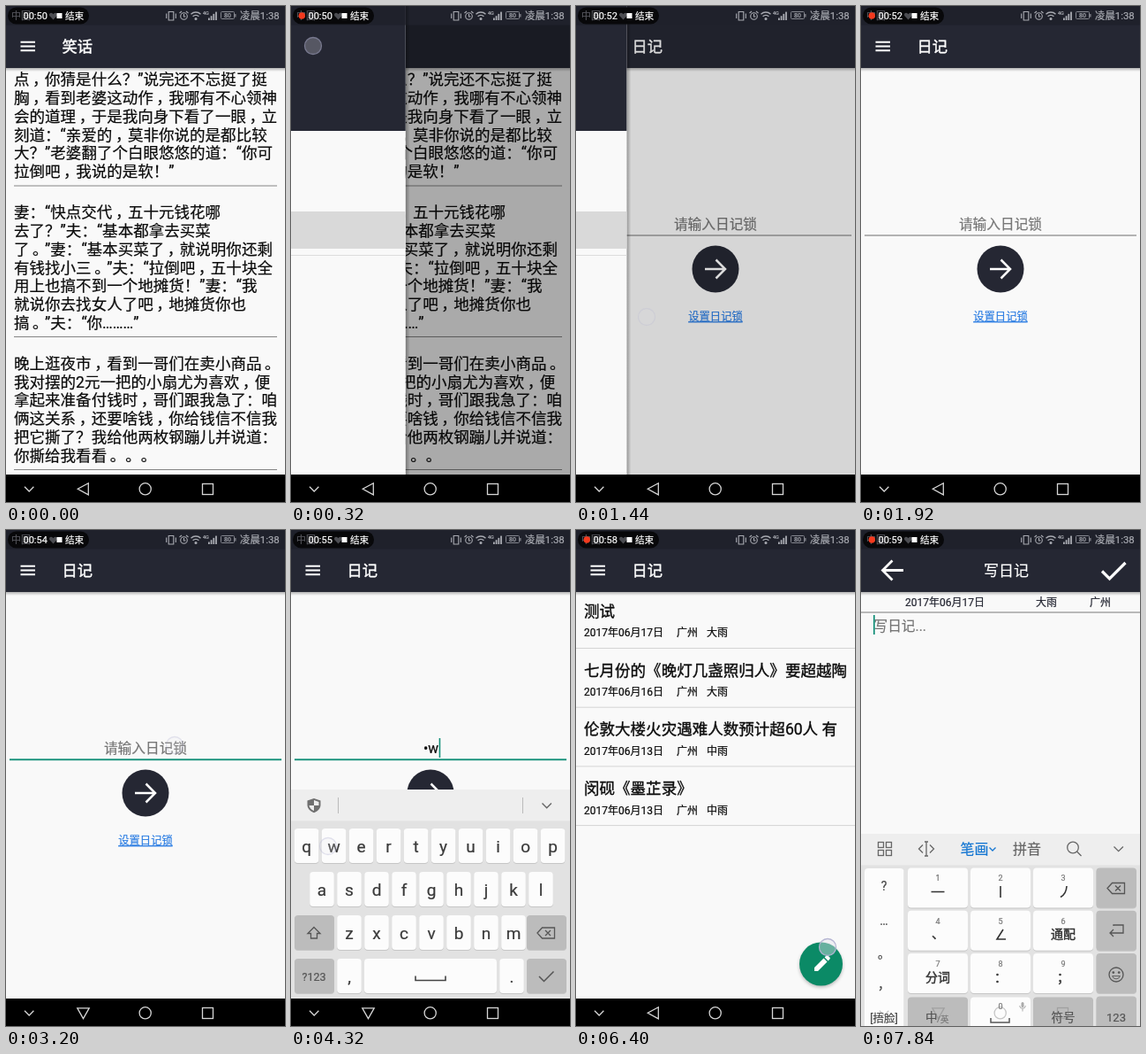
Write an HTML page that moves like this. It is 316x560 px and loops after 8 s.

```html
<!DOCTYPE html>
<html lang="zh-CN">
<head>
<meta charset="utf-8">
<title>日记</title>
<style>
html, body { margin: 0; width: 100%; height: 100%; overflow: hidden; background: #000; }
svg { display: block; width: 316px; height: 560px; }
text {
  font-family: Roboto, "Noto Sans CJK SC", "Noto Sans CJK", sans-serif;
  font-kerning: none; font-feature-settings: "chws" 0, "halt" 0; text-spacing-trim: space-all;
  white-space: pre;
}
</style>
</head>
<body>
<svg id="stage" viewBox="0 0 316 560">
  <defs>
    <linearGradient id="down" x2="0" y2="1">
      <stop stop-opacity=".28"/><stop offset="1" stop-opacity="0"/>
    </linearGradient>
    <linearGradient id="side">
      <stop stop-opacity=".3"/><stop offset="1" stop-opacity="0"/>
    </linearGradient>
    <filter id="soft" x="-30%" y="-30%" width="160%" height="160%"><feGaussianBlur stdDeviation="2"/></filter>
  </defs>
</svg>
<script>
const LOOP = 8000, STEP = 160, FLOOR = 529, MENU = 245;
const NAVY = '#252733', PAPER = '#f9f9f9', TEAL = '#15907a', INK = '#0c0c0c';
const stage = document.getElementById('stage');

function el(parent, tag, attrs = {}, str) {
  const node = document.createElementNS('http://www.w3.org/2000/svg', tag);
  for (const k in attrs) node.setAttribute(k, attrs[k]);
  if (str !== undefined) node.textContent = str;
  return parent.appendChild(node);
}
const group = (p, attrs) => el(p, 'g', attrs);
const rect = (p, x, y, width, height, fill, rx = 0) => el(p, 'rect', { x, y, width, height, fill, rx });
const disc = (p, cx, cy, r, fill) => el(p, 'circle', { cx, cy, r, fill });
const ring = (p, cx, cy, r, stroke, w = 1.3) =>
  el(p, 'circle', { cx, cy, r, fill: 'none', stroke, 'stroke-width': w });
const line = (p, d, stroke, w = 1.3, more) =>
  el(p, 'path', { d, fill: 'none', stroke, 'stroke-width': w, ...more });
const shape = (p, d, fill) => el(p, 'path', { d, fill });
// y is the middle of the glyphs
const text = (p, x, y, str, size, fill, more) => el(p, 'text',
  { x, y: y + size * 0.37, 'font-size': size, fill, stroke: fill, 'stroke-width': .22, ...more }, str);
const MID = { 'text-anchor': 'middle' };
const BOLD = { 'font-weight': 500, 'stroke-width': .45 };

// Commas and full stops sit nearer the middle of their cells
function prose(p, x, y, str, size) {
  const node = text(p, x, y, '', size, INK);
  str.split(/([，。]+)/).forEach((run, i) =>
    el(node, 'tspan', { dx: i ? (i % 2 ? size : -size) * .2 : 0 }, run));
}

function bars(p) {
  rect(p, 0, 0, 316, FLOOR, PAPER);
  rect(p, 0, 70, 316, 4, 'url(#down)');
  rect(p, 0, 0, 316, 70, NAVY);
  rect(p, 0, 0, 316, 21.5, '#1f212b');
}
function titled(title) {
  const p = group(stage);
  bars(p);
  line(p, 'M16.5 40.7h16.5M16.5 45.5h16.5M16.5 50.3h16.5', '#fff', 1.9);
  text(p, 63.5, 46, title, 17.3, '#fff', BOLD);
  return p;
}

// Jokes
const jokes = titled('笑话');
const stories = [
  [83, ['点，你猜是什么？”说完还不忘挺了挺', '胸，看到老婆这动作，我哪有不心领神', '会的道理，于是我向身下看了一眼，立',
    '刻道：“亲爱的，莫非你说的是都比较', '大？”老婆翻了个白眼悠悠的道：“你可', '拉倒吧，我说的是软！”']],
  [233, ['妻：“快点交代，五十元钱花哪', '去了？”夫：“基本都拿去买菜', '了。”妻：“基本买菜了，就说明你还剩',
    '有钱找小三。”夫：“拉倒吧，五十块全', '用上也搞不到一个地摊货！”妻：“我', '就说你去找女人了吧，地摊货你也', '搞。”夫：“你………”']],
  [403.5, ['晚上逛夜市，看到一哥们在卖小商品。', '我对摆的2元一把的小扇尤为喜欢，便', '拿起来准备付钱时，哥们跟我急了：咱',
    '俩这关系，还要啥钱，你给钱信不信我', '把它撕了？我给他两枚钢蹦儿并说道：', '你撕给我看看。。。']]
];
for (const [top, rows] of stories)
  rows.forEach((row, i) => prose(jokes, 9, top + i * 20.75, row, 17.55));
for (const y of [202.5, 373, 523]) rect(jokes, 9, y, 298, 1, '#858585');

// Diary lock
const lock = titled('日记');
const hint = text(lock, 158, 246.5, '请输入日记锁', 15.7, '#777', MID);
const entry = text(lock, 158.5, 246.5, '', 15.7, INK, MID);
const caret = rect(lock, 168, 235, 1.6, 22, TEAL);
const rule = rect(lock, 4, 258.5, 308, 1, '#6f6f6f');
const focusRule = rect(lock, 4, 258.3, 308, 1.9, TEAL);
disc(lock, 158, 297, 26.5, NAVY);
line(lock, 'M146 297h22M158.5 286.5l10.5 10.5l-10.5 10.5', '#fff', 2.5);
text(lock, 158, 350.5, '设置日记锁', 12.3, '#2f7fe3', { ...MID, 'text-decoration': 'underline' });

// Diary list
const list = titled('日记');
const notes = [
  ['测试', '17', '大雨'],
  ['七月份的《晚灯几盏照归人》要超越陶', '16', '大雨'],
  ['伦敦大楼火灾遇难人数预计超60人 有', '13', '中雨'],
  ['闵砚《墨芷录》', '13', '中雨']
];
notes.forEach(([title, day, sky], i) => {
  const y = i * 66.7;
  text(list, 9, 91.5 + y, title, 17.55, INK, { 'stroke-width': .35 });
  text(list, 9, 116 + y, `2017年06月${day}日`, 12, INK);
  text(list, 114, 116 + y, '广州', 12, INK);
  text(list, 148, 116 + y, sky, 12, INK);
  rect(list, 0, 133 + y, 316, 1, '#d4d4d4');
});
el(list, 'circle', { cx: 277.5, cy: 492, r: 24, opacity: .3, filter: 'url(#soft)' });
disc(list, 277.5, 490, 24.5, '#0b8a66');
shape(list, 'M270 494v4h4l10.5-10.5l-4-4zM281.6 482.4l4 4l1.8-1.8q.9-1 0-2l-2-2q-1-.9-2 0z', '#fff');

// New entry
const write = group(stage);
bars(write);
line(write, 'M48 45.5H25M35.5 34.5l-11 11l11 11', '#fff', 2.8);
line(write, 'M273 46.5l8.5 8.5l18-18', '#fff', 3.2);
text(write, 164.5, 46, '写日记', 17, '#fff', MID);
text(write, 50, 82, '2017年06月17日', 12, NAVY);
text(write, 198, 82, '大雨', 12, NAVY);
text(write, 259, 82, '广州', 12, NAVY);
rect(write, 0, 92.5, 316, 1, '#7a7a7a');
text(write, 14.5, 108, '写日记...', 15.7, '#777');
const pen = rect(write, 14, 96, 1.7, 22, TEAL);

// Drawer
const scrim = rect(stage, 0, 21.5, 316, FLOOR - 21.5, '#000');
const drawer = group(stage);
rect(drawer, MENU, 0, 5, FLOOR, 'url(#side)');
rect(drawer, 0, 0, MENU, FLOOR, PAPER);
rect(drawer, 0, 0, MENU, 141, NAVY);
rect(drawer, 0, 0, MENU, 21.5, '#1f212b');
disc(drawer, 35.5, 69, 6.2, '#fff');
shape(drawer, 'M23 87v-3c0-4 8-6.2 12.5-6.2s12.5 2.2 12.5 6.2v3z', '#fff');
text(drawer, 22, 118.5, 'aLumo', 12.2, '#fff', { 'font-weight': 500 });
rect(drawer, 0, 232, MENU, 42, '#d9d9d9');
rect(drawer, 0, 281, MENU, 1, '#dcdcdc');
text(drawer, 14, 303, '个人', 12.2, '#707070');
['新闻', '天气', '笑话', '日记', '备忘', '关于'].forEach((name, i) =>
  text(drawer, 63.3, 169 + i * 42 + (i > 2 ? 50 : 0), name, 12.2, INK, BOLD));
const GREY = '#6e6e6e';
rect(drawer, 16.5, 164.5, 9, 9, GREY, 1);
line(drawer, 'M18.5 168h5M18.5 171h5', PAPER, 1);
line(drawer, 'M27 166h6M27 169h6M27 172h6', GREY, 1.5);
disc(drawer, 25, 211, 5, GREY);
for (let i = 0; i < 8; i++)
  line(drawer, 'M25 204.8v-2.6', GREY, 1.5, { transform: `rotate(${i * 45} 25 211)` });
function smile(p, x, y, r, ink, w, mouth = 'none') {
  ring(p, x, y, r, ink, w);
  disc(p, x - r * .4, y - r * .3, r * .17, ink);
  disc(p, x + r * .4, y - r * .3, r * .17, ink);
  line(p, `M${x - r * .55} ${y + r * .2}a${r * .58} ${r * .6} 0 0 0 ${r * 1.1} 0z`, ink, w * .7, { fill: mouth });
}
smile(drawer, 25, 253, 7.2, '#2b2c36', 1.7, '#2b2c36');
rect(drawer, 18.5, 337.5, 13, 16, GREY, 1.5);
shape(drawer, 'M20.5 338.5h5v7l-2.5-1.7l-2.5 1.7z', PAPER);
text(drawer, 25, 385.5, 'A', 14.5, GREY, MID);
rect(drawer, 15.5, 393.5, 18.5, 3, '#c2c2c2');
for (const [x, y] of [[17.5, 422.5], [17.5, 430.5], [26, 430.5]]) rect(drawer, x, y, 6.8, 6.8, GREY);
el(drawer, 'rect', { x: 26, y: 422, width: 6.8, height: 6.8, fill: GREY, transform: 'rotate(45 29.4 425.4)' });

// Letter keyboard
const board = group(stage);
rect(board, 0, 293, 316, 36, '#eee');
rect(board, 0, 328.5, 316, 201, '#e2e2e2');
shape(board, 'M26 303l7.5 2.6v4.6c0 4.4-3.2 7.4-7.5 9c-4.3-1.6-7.5-4.6-7.5-9v-4.6z', '#707070');
shape(board, 'M26 305v6h5.5v-4zM26 311v6c-3-1.2-5.3-3.5-5.5-6z', '#eee');
rect(board, 53, 302, 1, 18, '#bbb');
rect(board, 262, 302, 1, 18, '#bbb');
line(board, 'M284.5 308.5l5.2 5.2l5.2-5.2', '#666', 1.4);
function key(p, x, y, w, h, dark) {
  rect(p, x, y + 1, w, h, '#c6c6c6', 4);
  return rect(p, x, y, w, h, dark ? '#bcbcbc' : '#fcfcfc', 4);
}
[['qwertyuiop', 17.6, 337], ['asdfghjkl', 35, 386], ['zxcvbnm', 66, 435]].forEach(([row, x0, y]) =>
  [...row].forEach((c, i) => {
    const x = x0 + i * 31;
    key(board, x - 13.8, y, 27.6, 39);
    text(board, x, y + 20, c, 19, '#3a3a3a', MID);
  }));
for (const [x, y, w, dark] of [[4, 435, 45, 1], [267, 435, 45, 1], [4, 484, 45, 1], [52.2, 484, 27.6],
  [83, 484, 150], [236.2, 484, 27.6], [267, 484, 45, 1]]) key(board, x, y, w, 39, dark);
line(board, 'M26 448.5l7 7h-3.5v5.5h-7v-5.5h-3.5z', '#555', 1.3);
text(board, 26, 504.5, '?123', 12.5, '#555', MID);
text(board, 66, 504, ',', 19, '#3a3a3a', MID);
text(board, 250, 504, '.', 19, '#3a3a3a', MID);
line(board, 'M141 503.5v5h34v-5', '#444', 1.6);
line(board, 'M281 504l5.5 5.5l11-11', '#555', 1.5);
function backspace(p, x, y) {
  line(p, `M${x - 10} ${y}l5.5-6h14v12h-14zM${x - 1} ${y - 3}l6 6m0-6l-6 6`, '#555', 1.3);
}
backspace(board, 289, 455);

// Navigation bar
function navIcons(p, ink) {
  line(p, 'M21 542.8l5.2 5.2l5.2-5.2', ink);
  ring(p, 157.7, 545.3, 6.6, ink);
  el(p, 'rect', { x: 222.5, y: 539.5, width: 12, height: 12, fill: 'none', stroke: ink, 'stroke-width': 1.3 });
  return [line(p, 'M93.3 538.8v13l-12-6.5z', ink), line(p, 'M80.8 539.8h13.4l-6.7 11.8z', ink)];
}
rect(stage, 0, FLOOR, 316, 560 - FLOOR, '#000');
const [navBack, navHide] = navIcons(stage, '#d6d6d6');

// Stroke keyboard
const strokes = group(stage);
rect(strokes, 0, 343, 316, 36, '#eee');
rect(strokes, 0, 378.5, 316, 182, '#e2e2e2');
for (const [x, y] of [[19.5, 352.5], [28.5, 352.5], [19.5, 361.5], [28.5, 361.5]])
  el(strokes, 'rect', { x, y, width: 6, height: 6, fill: 'none', stroke: '#666', 'stroke-width': 1.3 });
line(strokes, 'M70 355.5l-4.5 4.5l4.5 4.5M78 355.5l4.5 4.5l-4.5 4.5M74 352v16M72 352h4M72 368h4', '#666');
text(strokes, 112.5, 360, '笔画', 16, '#1677d2');
line(strokes, 'M145.5 358.5l3.5 3.5l3.5-3.5', '#1677d2');
text(strokes, 172, 360, '拼音', 16, '#666');
ring(strokes, 240, 358.5, 6.3, '#666');
line(strokes, 'M244.5 363l5 5M286.5 357.5l5.2 5.2l5.2-5.2', '#666');
key(strokes, 4, 382, 44.5, 190);
[['?', 402], ['…', 441], ['。', 478], ['，', 513]].forEach(([s, y]) =>
  text(strokes, 26, y, s, 14, '#444', MID));
text(strokes, 26, 551, '[捂脸]', 12.5, '#444', MID);
const labels = ['', '', '', '、', '', '通配', '分词', '：', '；'];
labels.forEach((label, i) => {
  const x = 87 + i % 3 * 71, y = 381.5 + Math.floor(i / 3) * 48.3;
  key(strokes, x - 34, y, 68, 45);
  text(strokes, x, y + 11.5, i + 1, 9, '#777', MID);
  text(strokes, x, y + 26.5, label, 14, '#333', { ...BOLD, ...MID });
});
line(strokes, 'M79.5 408.5h15M158 402v13M233 402q-.5 9-7 12.5M161 451l-7 11h10', '#333', 1.6);
for (let i = 0; i < 4; i++) key(strokes, 266.5, 381.5 + i * 48.3, 45.5, 45, 1);
backspace(strokes, 289, 404.5);
line(strokes, 'M286 447v-1h11v9h-14M286 451l-4 4l4 4', '#555');
smile(strokes, 289, 502, 8, '#555', 1.3);
key(strokes, 53, 527.5, 68, 45, 1);
key(strokes, 124, 527.5, 68, 45);
key(strokes, 195, 527.5, 68, 45, 1);
text(strokes, 73, 550, '中', 13.5, '#555');
text(strokes, 86, 552, '/英', 9.5, '#777');
text(strokes, 158, 538, '0', 9, '#777', MID);
line(strokes, 'M147 551v5h21v-5', '#555', 1.5);
rect(strokes, 181.5, 533, 3, 6, '#aaa', 1.5);
line(strokes, 'M179.7 537a3.3 3.3 0 0 0 6.6 0M183 540.5v3', '#aaa', 1);
text(strokes, 229, 550, '符号', 13.5, '#555', MID);
text(strokes, 289, 550, '123', 13, '#555', MID);
navIcons(group(strokes, { opacity: .4 }), '#777')[0].remove();

// Status bar
const GHOST = '#a9abb2';
line(stage, 'M184.2 6.5h5.6v9.5h-5.6zM181.7 8.5v5.5M192.3 8.5v5.5', GHOST, 1.1);
ring(stage, 201.5, 11.5, 3.8, GHOST, 1.1);
line(stage, 'M201.5 9v3h2M196.5 8l2.5-2M206.5 8l-2.5-2', GHOST, 1.1);
line(stage, 'M209.5 9.3a7.8 7.8 0 0 1 11 0M211.6 11.8a4.8 4.8 0 0 1 6.8 0', GHOST, 1.4);
disc(stage, 215, 14.5, 1.5, GHOST);
text(stage, 223, 8, '4G', 5.5, GHOST);
for (let i = 0; i < 4; i++) rect(stage, 229 + i * 2.7, 13.5 - i * 2.3, 1.8, 2.5 + i * 2.3, GHOST);
el(stage, 'rect', { x: 243.5, y: 6.5, width: 15, height: 8, rx: 1, fill: 'none', stroke: '#85878f' });
rect(stage, 259.2, 9, 1.3, 3.5, '#85878f');
text(stage, 251, 10.6, '80', 7, GHOST, MID);
text(stage, 265, 11, '凌晨1:38', 11.4, GHOST);
rect(stage, 2, 1.5, 92, 19, '#08080a', 9.5);
text(stage, 6, 11, '中国', 11, '#55565c');
shape(stage, 'M53.5 15.5l-4.3-4.6q-.8-3 2-3.2q1.6 0 2.3 1.6q.7-1.6 2.3-1.6q2.8.2 2 3.2z', '#4c4d52');
const recDot = disc(stage, 12.3, 11, 3.7, '#f43a1e');
const clock = text(stage, 19.5, 11, '00:50', 11, '#fff');
rect(stage, 57.5, 8, 6, 6, '#fff');
text(stage, 67, 11, '结束', 10.6, '#fff');

// Finger
const finger = group(stage);
disc(finger, 0, 0, 9.5, 'rgba(226,226,236,.45)');
ring(finger, 0, 0, 9.5, '#b4b4d2', 1.3);

const taps = [[130, 25, 45], [1100, 80, 351], [2900, 191, 243], [3590, 49, 357], [4040, 42, 357],
  [4420, 80, 357], [4660, 111, 357], [4980, 289, 504], [5620, 158, 297], [6380, 285, 471]];
const FADE = 450;
const typed = [[3700, 'w'], [4150, 'w'], [4520, 'e'], [4760, 'r']];

const part = (t, from, dur) => Math.min(1, Math.max(0, (t - from) / dur));
const out = (u, n = 5) => 1 - (1 - u) ** n;
const show = (node, on) => node.setAttribute('display', on ? 'inline' : 'none');
const shift = (node, x, y) => node.setAttribute('transform', `translate(${x} ${y})`);

function draw(t) {
  const open = out(part(t, 250, 500)) - out(part(t, 1314, 500));
  show(jokes, t < 1314);
  show(lock, t >= 1314 && t < 5850);
  show(list, t >= 5850 && t < 7300);

  show(drawer, open > .002);
  shift(drawer, -MENU * (1 - open), 0);
  scrim.setAttribute('opacity', .6 * open);

  const focus = t >= 3100;
  show(rule, !focus);
  show(focusRule, focus);
  const keys = typed.filter(([at]) => at <= t);
  const last = keys[keys.length - 1];
  entry.textContent = last
    ? '•'.repeat(keys.length - 1) + (t - last[0] < 600 ? last[1] : '•') : '';
  show(hint, !last);
  show(caret, last);
  if (last) caret.setAttribute('x', 158.5 + entry.getComputedTextLength() / 2 + .6);

  const up = out(part(t, 3300, 260), 3) - part(t, 5100, 250) ** 2;
  show(board, up > 0);
  shift(board, 0, 236 * (1 - up));
  const typing = t >= 3150 && t < 5300;
  show(navHide, typing);
  show(navBack, !typing);

  const enter = out(part(t, 7000, 300), 3);
  show(write, enter > 0);
  write.setAttribute('opacity', enter);
  shift(write, 0, 30 * (1 - enter));
  show(pen, t >= 7400);
  show(strokes, t >= 7760);

  clock.textContent = '00:' + (50 + Math.floor((t + 380) / 840));
  const blink = t % 840;
  show(recDot, blink >= 180 && blink < 600);

  const tap = taps.filter(([at]) => at <= t && t < at + FADE).pop();
  show(finger, tap);
  if (tap) {
    shift(finger, tap[1], tap[2]);
    finger.setAttribute('opacity', 1 - (t - tap[0]) / FADE);
  }
}

const start = performance.now();
function tick() {
  const t = (performance.now() - start + 2) % LOOP;
  draw(Math.floor(t / STEP) * STEP);
  requestAnimationFrame(tick);
}
tick();
</script>
</body>
</html>
```
